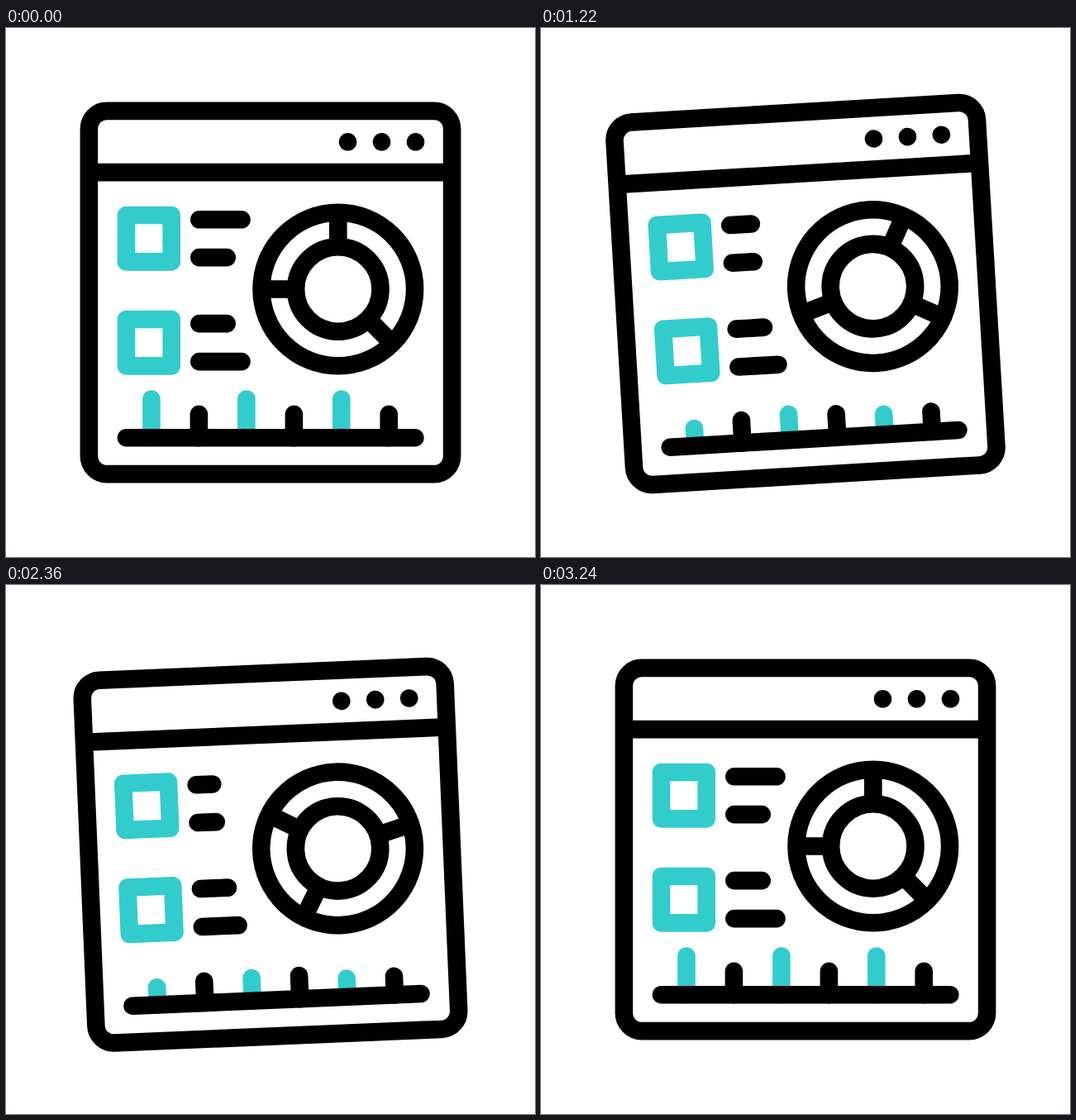
An HTML page that plays this animation: 640x640 px, repeating every 3600 ms.

```html
<!DOCTYPE html>
<html lang="en">
<head>
<meta charset="utf-8">
<title>Dashboard window</title>
<style>
  html, body { margin: 0; width: 100%; height: 100%; overflow: hidden; background: #fff; }
  svg { display: block; width: 100vw; height: 100vh; }
</style>
</head>
<body>
<svg viewBox="0 0 640 640" fill="none" stroke="#000" stroke-width="21.6">
  <g id="win">
    <rect x="100.4" y="100.4" width="439.2" height="439.2" rx="21.6"/>
    <path d="M100.4 174.6H539.6"/>
    <g fill="#000" stroke="none">
      <circle cx="413.5" cy="137.8" r="10.8"/>
      <circle cx="454.5" cy="137.8" r="10.8"/>
      <circle cx="495.5" cy="137.8" r="10.8"/>
    </g>
    <g fill="#3cc" stroke="none">
      <path id="box" fill-rule="evenodd" d="M145.5 215.7H200.2a10.8 10.8 0 0 1 10.8 10.8V282.9a10.8 10.8 0 0 1 -10.8 10.8H145.5a10.8 10.8 0 0 1 -10.8 -10.8V226.5a10.8 10.8 0 0 1 10.8 -10.8ZM156.3 237.3V272.1H189.4V237.3Z"/>
      <use href="#box" y="126"/>
    </g>
    <g id="strokes" stroke-linecap="round"></g>
    <path d="M145.5 495.7H494.8" stroke-linecap="round"/>
    <circle cx="401.8" cy="316" r="92.8"/>
    <circle cx="401.8" cy="316" r="51.2"/>
    <path id="spokes" d="M401.8 264.8V223.2M350.6 316H309M438 352.2L467.4 381.6"/>
  </g>
</svg>
<script>
const LOOP = 3600, SPIN = 3200, HALF = 600, CYCLES = 2;

// [time, value] pairs, eased between neighbours
const LIFT = [[0, 0], [800, 38.4], [1560, -25.2], [2160, 18], [2640, -12.8], [3000, 0]];
const TILT = [[200, 0], [1000, -5.1], [1760, 3.2], [2360, -2.4], [2840, 1.1], [3200, 0]];

// text lines: y, full length, short length, delay
const LINES = [
  [231.8, 72.8, 30, 360],
  [277.6, 55, 30, 240],
  [357.6, 55, 30, 0],
  [403.6, 72.8, 30, 120]
];
// chart bars: x, full height, short height, delay, colour
const BARS = [
  [176, 46.8, 21, 600, '#3cc'],
  [233.4, 28.5, 15.3, 120, '#000'],
  [290.9, 46.8, 21, 360, '#3cc'],
  [348.4, 28.5, 15.3, 0, '#000'],
  [405.8, 46.8, 21, 480, '#3cc'],
  [463.2, 28.5, 15.3, 240, '#000']
];

const byId = id => document.getElementById(id);
const win = byId('win'), spokes = byId('spokes'), strokes = byId('strokes');

function ease(u) {
  u = Math.min(1, Math.max(0, u));
  return u * u * (3 - 2 * u);
}

function track(keys, t) {
  let value = keys[0][1];
  for (let i = 1; i < keys.length; i++) {
    const [t0, v0] = keys[i - 1], [t1, v1] = keys[i];
    value += (v1 - v0) * ease((t - t0) / (t1 - t0));
  }
  return value;
}

// shrink and grow back, twice, after a delay
function pulse(full, short, delay, t) {
  const phase = (t - delay) / HALF;
  if (phase <= 0 || phase >= 2 * CYCLES) return full;
  return full - (full - short) * ease(1 - Math.abs(phase % 2 - 1));
}

function addStroke(color) {
  const path = document.createElementNS('http://www.w3.org/2000/svg', 'path');
  path.setAttribute('stroke', color);
  return strokes.appendChild(path);
}

const linePaths = LINES.map(() => addStroke('#000'));
const barPaths = BARS.map(bar => addStroke(bar[4]));

function draw(t) {
  win.setAttribute('transform', `translate(0 ${track(LIFT, t)}) rotate(${track(TILT, t)} 320 320)`);
  spokes.setAttribute('transform', `rotate(${360 * ease(t / SPIN)} 401.8 316)`);
  LINES.forEach(([y, full, short, delay], i) => {
    const end = 223 + pulse(full, short, delay, t) - 10.8;
    linePaths[i].setAttribute('d', `M233.8 ${y}H${end}`);
  });
  BARS.forEach(([x, full, short, delay], i) => {
    const top = 485 - pulse(full, short, delay, t) + 10.8;
    barPaths[i].setAttribute('d', `M${x} 495.7V${top}`);
  });
}

const start = performance.now();
function tick() {
  draw((performance.now() - start) % LOOP);
  requestAnimationFrame(tick);
}
tick();
</script>
</body>
</html>
```
